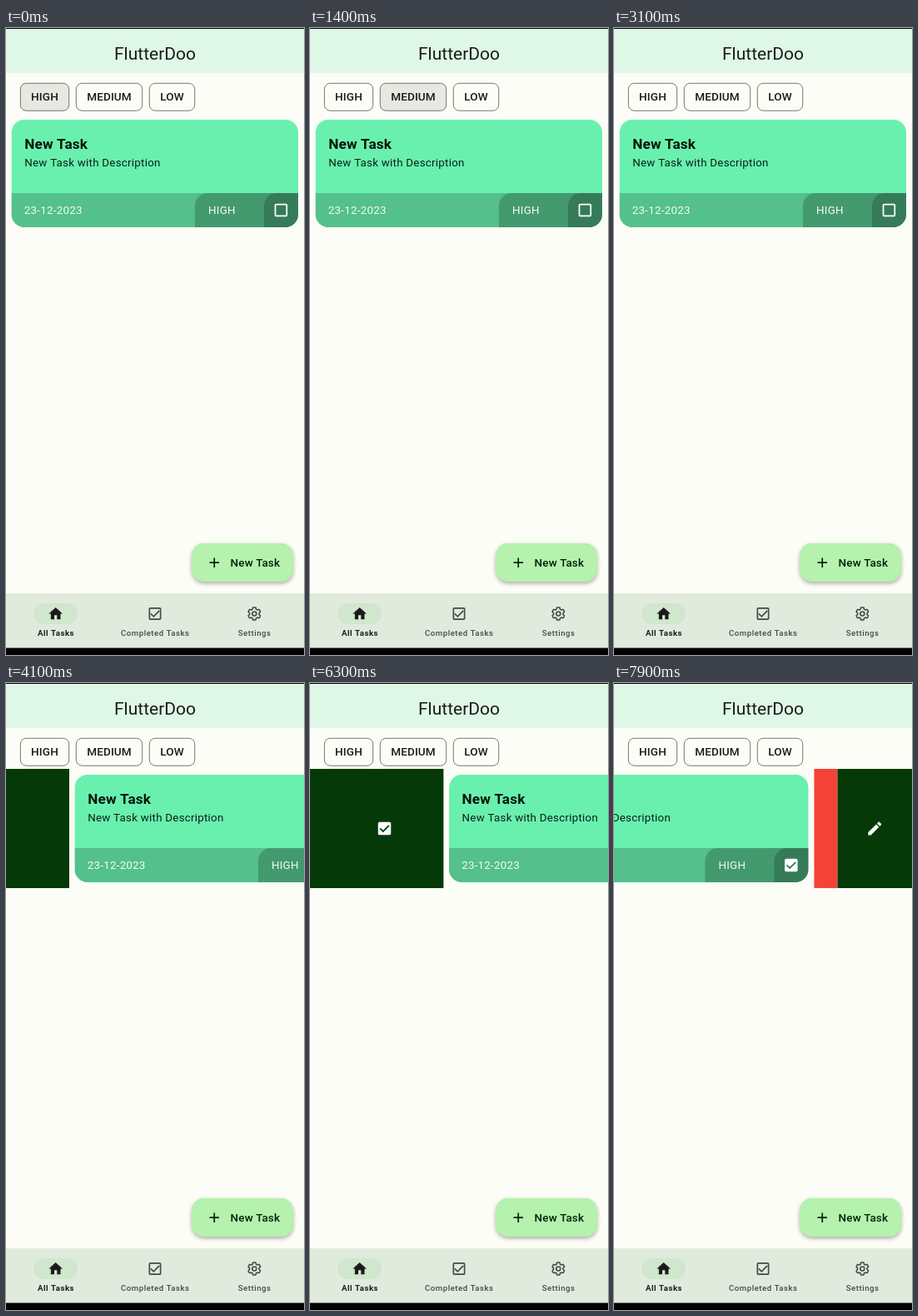
An HTML page with a canvas for the animation above (8000 ms loop, 358 by 752 pixels).

```html
<!DOCTYPE html>
<html lang="en">
<head>
<meta charset="utf-8">
<title>FlutterDoo</title>
<style>
  html, body { margin: 0; width: 100%; height: 100%; overflow: hidden; background: #fcfdf6; }
  canvas { display: block; width: 358px; height: 752px; }
</style>
</head>
<body>
<canvas id="stage"></canvas>
<script>
const W = 358, H = 752, LOOP = 8000, STEP = 100, OPEN = W / 2;
const INK = '#1a1c19', MUTED = '#424940', DARK = '#2f2e41', PANE = '#053a08', PAGE = '#fcfdf6';
const BODY = 13.36;
const canvas = document.getElementById('stage');
const ctx = canvas.getContext('2d');
const dpr = window.devicePixelRatio || 1;
canvas.width = W * dpr;
canvas.height = H * dpr;

const progress = (t, start, length) => Math.min(1, Math.max(0, (t - start) / length));
const ease = (t, start, length) => {
  const p = progress(t, start, length);
  return p * p * (3 - 2 * p);
};
// Ink that appears just before a tap and fades after it.
const ripple = (t, at) => ease(t, at - 150, 100) - ease(t, at + 50, 300);

function rect(x, y, w, h, color) {
  ctx.fillStyle = color;
  ctx.fillRect(x, y, w, h);
}

function round(x, y, w, h, r, color) {
  ctx.beginPath();
  ctx.roundRect(x, y, w, h, r);
  ctx.fillStyle = color;
  ctx.fill();
}

function outline(x, y, w, h, r, color, width) {
  ctx.beginPath();
  ctx.roundRect(x, y, w, h, r);
  ctx.strokeStyle = color;
  ctx.lineWidth = width;
  ctx.stroke();
}

function ellipse(x, y, rx, ry, color) {
  ctx.beginPath();
  ctx.ellipse(x, y, rx, ry, 0, 0, Math.PI * 2);
  ctx.fillStyle = color;
  ctx.fill();
}

const disc = (x, y, r, color) => ellipse(x, y, r, r, color);

function shape(d, color) {
  ctx.fillStyle = color;
  ctx.fill(new Path2D(d));
}

function line(d, color, width) {
  ctx.strokeStyle = color;
  ctx.lineWidth = width;
  ctx.stroke(new Path2D(d));
}

function text(str, x, y, size, weight, color, { align = 'left', gap = 0 } = {}) {
  ctx.font = `${weight} ${size}px Roboto, sans-serif`;
  ctx.letterSpacing = gap + 'px';
  ctx.textAlign = align;
  ctx.fillStyle = color;
  ctx.fillText(str, x, y);
}

// Runs draw in a 24-unit icon box centred on x, y.
function icon(x, y, scale, draw) {
  ctx.save();
  ctx.translate(x, y);
  ctx.scale(scale, scale);
  ctx.translate(-12, -12);
  draw();
  ctx.restore();
}

function checkbox(x, y, scale, color, { tick, filled }) {
  icon(x, y, scale, () => {
    if (filled) round(3, 3, 18, 18, 2, color);
    else outline(4, 4, 16, 16, 1, color, 2);
    if (tick) line('M5.7 11.7L10 16L18.3 7.7', tick, 2);
  });
}

const home = color => shape('M10 20v-6h4v6h5v-8h3L12 3 2 12h3v8z', color);
const pencil = color => shape(
  'M3 17.25V21h3.75L17.8 9.95l-3.75-3.75zM15.1 5.1l2.2-2.2h.8l3 3v.8l-2.2 2.2z', color);

function gear(color) {
  const steps = 90;
  ctx.beginPath();
  for (let i = 0; i < steps; i++) {
    const a = i / steps * Math.PI * 2;
    const r = 8 + Math.max(-1.1, Math.min(1.1, .6 - 3 * Math.cos(6 * a)));
    ctx.lineTo(12 + r * Math.cos(a), 12 + r * Math.sin(a));
  }
  ctx.closePath();
  ctx.moveTo(15, 12);
  ctx.arc(12, 12, 3, 0, Math.PI * 2);
  ctx.strokeStyle = color;
  ctx.lineWidth = 1.9;
  ctx.stroke();
}

const chips = [
  { label: 'HIGH', w: 59, on: 0, off: 500 },
  { label: 'MEDIUM', w: 80, on: 1400, off: 1800 },
  { label: 'LOW', w: 55, on: 1800, off: 2600 }
];

function drawChips(t) {
  const top = 66, h = 33.5, r = 7;
  let x = 17;
  for (const { label, w, on, off } of chips) {
    const k = ease(t, on, 250) - ease(t, off, 200);
    const ink = .09 * ripple(t, on) + .05 * ripple(t, off);
    const grow = 19 * k;
    round(x, top, w + grow, h, r, `rgba(216,232,211,${k})`);
    round(x, top, w + grow, h, r, `rgba(28,27,31,${ink})`);
    outline(x + .3, top + .3, w + grow - .6, h - .6, r, `rgba(114,121,111,${1 - k})`, 1);
    line(`M${x + 12.5} 83l3 3l6.3-6.6`, `rgba(26,28,25,${k})`, 1.5);
    text(label, x + w / 2 + grow, 87.2, 13.6, 500, INK, { align: 'center', gap: .1 });
    x += w + grow + 8;
  }
}

function drawPanes(offset) {
  const top = 103, h = 143, mid = top + h / 2;
  ctx.save();
  ctx.beginPath();
  ctx.rect(offset > 0 ? 0 : W + offset, top, Math.abs(offset), h);
  ctx.clip();
  if (offset > 0) {
    rect(0, top, OPEN, h, PANE);
    checkbox(OPEN / 2, mid, .86, '#fff', { tick: PANE, filled: true });
  } else {
    rect(OPEN, top, OPEN / 2, h, '#f44336');
    rect(OPEN * 1.5, top, OPEN / 2, h, PANE);
    icon(OPEN * 1.75, mid, .88, () => pencil('#fff'));
  }
  ctx.restore();
}

function drawCard(offset, done) {
  const shade = 'rgba(0,0,0,.2)', pale = '#f2fbf6', gap = .24, r = 15.3;
  if (offset) drawPanes(offset);
  ctx.save();
  ctx.translate(offset, 0);
  ctx.save();
  ctx.beginPath();
  ctx.roundRect(6.7, 110, 344.3, 129, r);
  ctx.clip();
  rect(6, 110, 346, 130, '#69f0ae');
  for (const x of [0, 227, 310]) round(x, 198, W - x, 42, x && [r, 0, 0, 0], shade);
  ctx.restore();
  text('New Task', 22.2, 145, 17.2, 700, '#08160e', { gap: .14 });
  text('New Task with Description', 22.2, 165.5, BODY, 400, '#0c2016', { gap });
  text('23-12-2023', 21.8, 223, BODY, 400, pale, { gap });
  text('HIGH', 243, 223, BODY, 400, pale, { gap });
  checkbox(330.4, 218.5, .86, '#fff', { tick: done && '#367b59', filled: done });
  ctx.restore();
}

function drawEmpty() {
  const navy = '#3f3d56', skin = '#ffb8b8', lime = '#3df23f';
  disc(198.5, 343, 60, navy);
  disc(198.5, 343, 46, 'rgba(0,0,0,.05)');
  disc(198.5, 343, 30, 'rgba(0,0,0,.08)');
  ellipse(161, 438, 61.5, 10.5, navy);

  // Walker: hand, legs, jumper, face, hair.
  ellipse(167, 386, 2.7, 4.5, skin);
  shape('M142 377H165Q168 400 166 414L168 435L173 443Q169 447 162 444L161 422L153 393L147 412L145 432Q140 437 135 433L137 408Q138 392 142 377Z', DARK);
  shape('M148 333Q155 330 160 335Q165 342 165 354L169.5 383L164.5 386L163 380H141Q142 371 137.5 364Q134 350 139 340Q142 335 148 333Z', '#d0cde1');
  ellipse(160.5, 327.5, 5, 6, skin);
  shape('M150 331Q148 322 153 318.5Q160 316 166 320.5Q166 324 160.5 325L158.5 331L155 334Z', DARK);

  let y = 428, r = 8.6;
  disc(210.5, 431, r, lime);
  for (let i = 0; i < 3; i++) {
    disc(110.5, y, r, lime);
    r *= .72;
    y -= r * 1.9;
  }
  text('No Tasks Here', 179, 489.3, 23.2, 700, INK, { align: 'center' });
}

function drawNav() {
  const y = 702.5, scale = .83;
  const tabs = [
    { label: 'All Tasks', color: INK, weight: 700, draw: home },
    { label: 'Completed Tasks', color: MUTED, weight: 500 },
    { label: 'Settings', color: MUTED, weight: 500, draw: gear }
  ];
  rect(0, 678, W, 66, '#e1ebdd');
  round(33.2, 690, 53, 25, 12.5, '#d0e6cd');
  tabs.forEach(({ label, color, weight, draw }, i) => {
    const x = W * (i + .5) / 3;
    if (draw) icon(x, y, scale, () => draw(color));
    else checkbox(x, y, scale, color, { tick: color });
    text(label, x + .3, 728.8, 9.6, weight, color, { align: 'center', gap: .55 });
  });
  rect(0, 743.5, W, 9, '#000');
}

function drawButton() {
  const ink = '#04210a';
  ctx.save();
  ctx.shadowColor = 'rgba(0,0,0,.32)';
  ctx.shadowBlur = 5 * dpr;
  ctx.shadowOffsetY = 2.2 * dpr;
  round(223.3, 618, 121.7, 46, 14.5, '#b4f2ad');
  ctx.restore();
  line('M244.5 641.2h11.5M250.25 635.45v11.5', ink, 1.7);
  text('New Task', 269.6, 645.8, 13.5, 500, ink, { gap: .1 });
}

function drawHeader() {
  rect(0, 0, W, 54, '#def7e6');
  rect(0, 0, W, 1, '#000');
  text('FlutterDoo', 179, 38.2, 21, 400, INK, { align: 'center' });
}

// Drag open to the right, settle back, then drag to the left.
function swipe(t) {
  const drag = 1 - (1 - progress(t, 4000, 400)) ** 1.92;
  return OPEN * (drag - ease(t, 6200, 500) - ease(t, 7700, 330));
}

function render(now) {
  const t = Math.floor((now % LOOP) / STEP) * STEP;
  ctx.setTransform(dpr, 0, 0, dpr, 0, 0);
  rect(0, 0, W, H, PAGE);
  if (t >= 1500 && t < 2700) drawEmpty();
  else drawCard(swipe(t), t >= 5800);
  drawChips(t);
  drawButton();
  drawNav();
  drawHeader();
}

const start = performance.now();
function tick() {
  render(performance.now() - start);
  requestAnimationFrame(tick);
}
tick();
</script>
</body>
</html>
```
